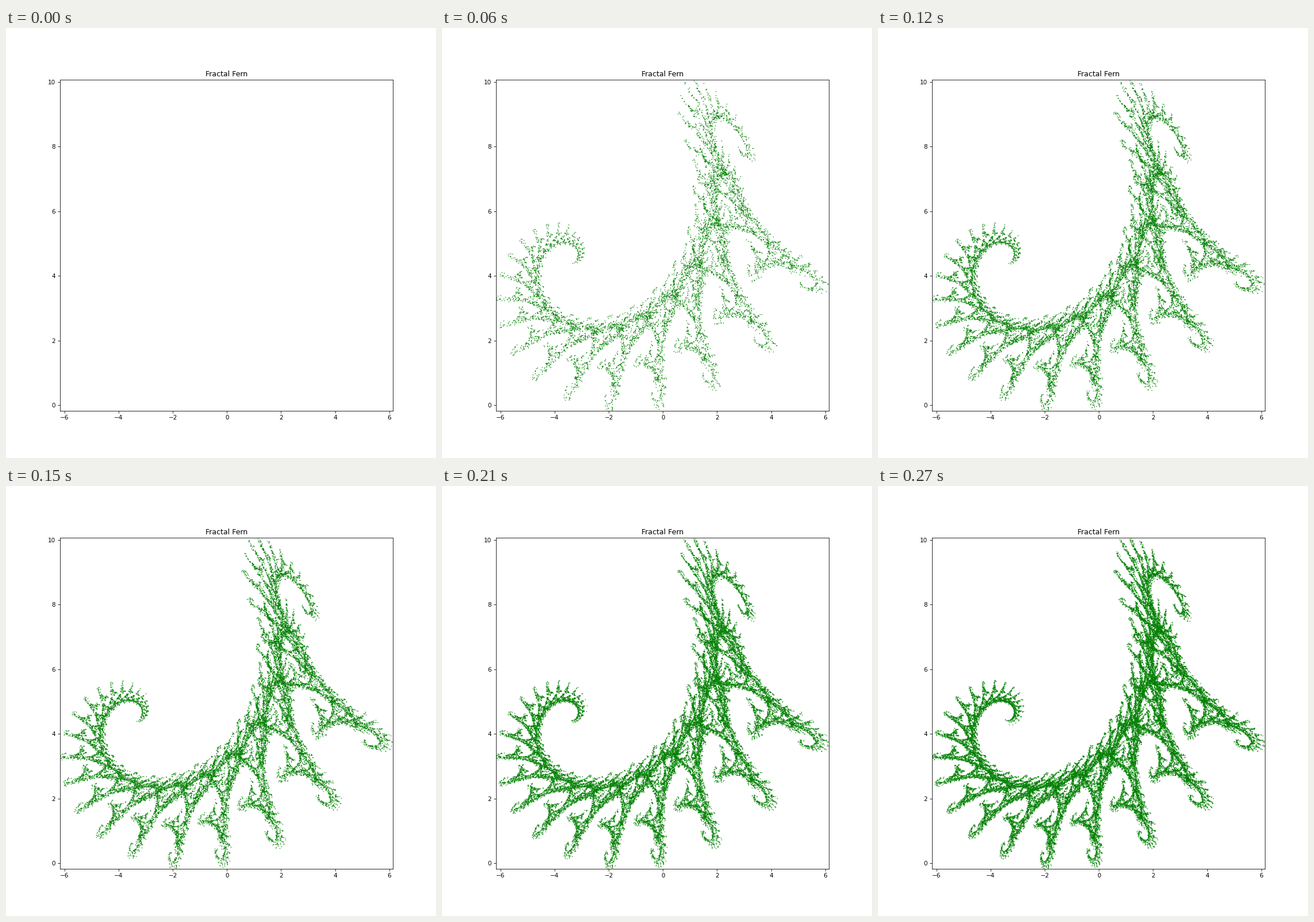
Recreate the animation shown at these times as a matplotlib script. Size 748x748 px, loop 0.3 s.

```python
import random

import matplotlib.pyplot as plt
import numpy as np
from matplotlib.animation import FuncAnimation

FRAMES = 10
STEP = 5000

# Two affine maps: x' = a x + b y + e, y' = c x + d y + f
BODY = (0.824074, 0.281482, -0.212346, 0.864198, -1.882290, -0.110607)
LIMB = (0.088272, 0.520988, -0.463889, -0.377778, 0.785360, 8.095795)
BODY_CHANCE = 0.787473


def fern(count, seed=4):
    rng = random.Random(seed)
    points = np.empty((count, 2))
    x = y = 0.0
    for i in range(count):
        points[i] = x, y
        a, b, c, d, e, f = BODY if rng.random() < BODY_CHANCE else LIMB
        x, y = a * x + b * y + e, c * x + d * y + f
    return points


points = fern(FRAMES * STEP)

fig, ax = plt.subplots(figsize=(10, 10), dpi=74.8)
ax.set_title("Fractal Fern")
ax.set_xlim(-6.176, 6.135)
ax.set_ylim(-0.175, 10.077)
dots, = ax.plot([], [], ".", color="green", markersize=1)


def draw(frame):
    shown = points[:frame * STEP]
    dots.set_data(shown[:, 0], shown[:, 1])
    return dots,


anim = FuncAnimation(fig, draw, frames=FRAMES, init_func=lambda: draw(0),
                     interval=30, repeat=True, repeat_delay=0)
plt.show()
```
